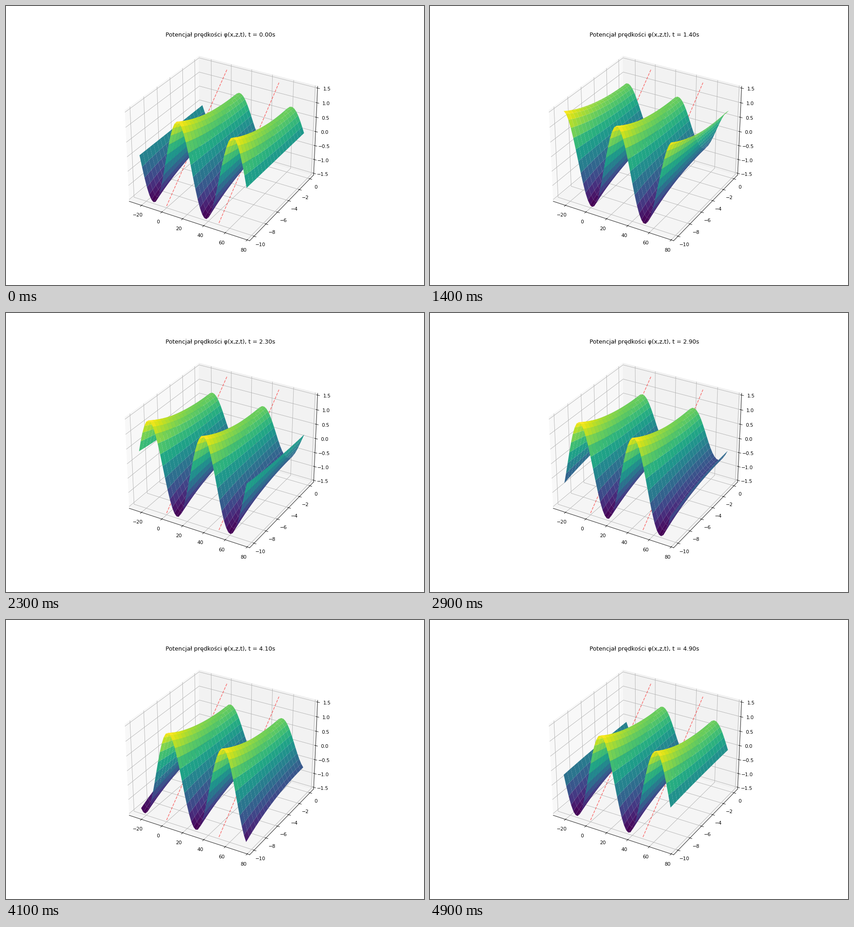
Write a matplotlib script that moves like this. It is 917 px wide and 611 px high and loops after 5000 ms.

```python
import numpy as np
import matplotlib.pyplot as plt
from matplotlib.animation import FuncAnimation

DPI = 76.4
FRAMES, STEP = 50, 0.1
WAVELENGTH, PERIOD, DEPTH = 50.0, 5.0, 10.0
K = 2 * np.pi / WAVELENGTH
OMEGA = 2 * np.pi / PERIOD

x, z = np.meshgrid(np.linspace(-WAVELENGTH / 2, 1.5 * WAVELENGTH, 50),
                   np.linspace(-DEPTH, 0, 20))


def potential(t):
    return np.cosh(K * z) / OMEGA * np.sin(K * x - OMEGA * t)


fig = plt.figure(figsize=(917 / DPI, 611 / DPI), dpi=DPI)
ax = fig.add_subplot(projection="3d")
for wall in (0, WAVELENGTH):
    ax.plot([wall, wall], [-DEPTH, 0], [-1.5, 1.5], "r--", alpha=0.5)

# A thin margin keeps the outermost ticks off the pane edges.
margin = 1 / 48
ax.set_xlim(-30, 80, view_margin=margin)
ax.set_ylim(-10.5, 0.5, view_margin=margin)
ax.set_zlim(-1.5, 1.5, view_margin=margin)

surface = None


def update(frame):
    global surface
    if surface is not None:
        surface.remove()
    t = frame * STEP
    surface = ax.plot_surface(x, z, potential(t), cmap="viridis")
    ax.set_title(f"Potencjał prędkości φ(x,z,t), t = {t:.2f}s")
    return []


anim = FuncAnimation(fig, update, frames=FRAMES, interval=1000 * STEP,
                     init_func=lambda: [], repeat=True, repeat_delay=0)
plt.show()
```
